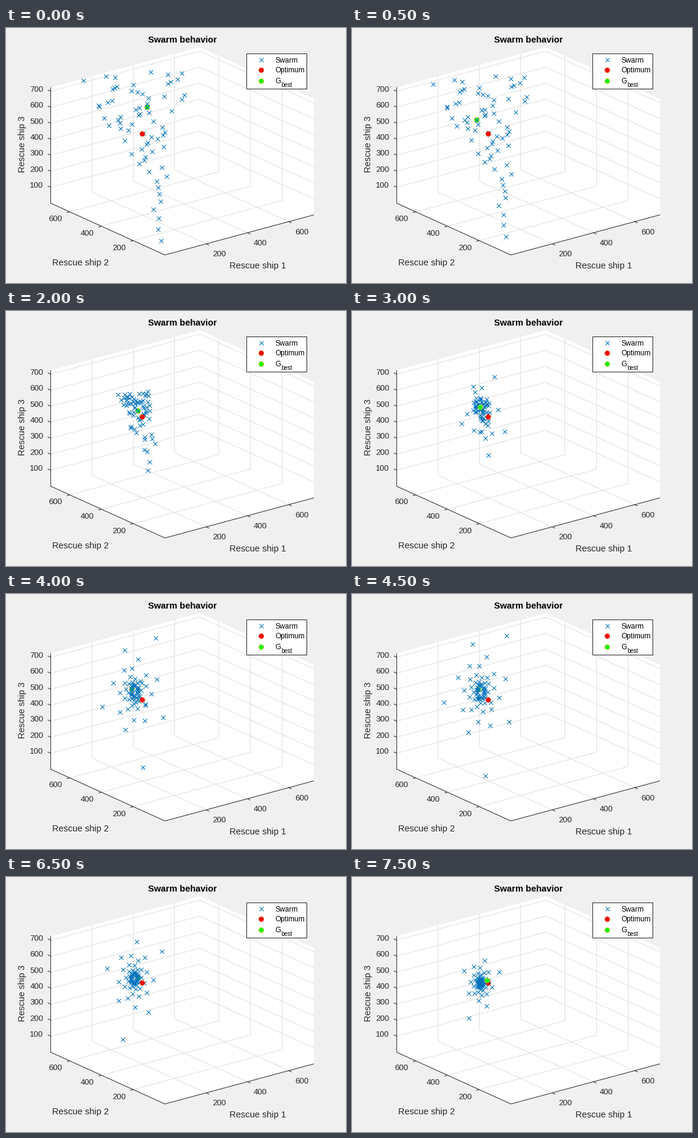
A matplotlib script for the animation above (8 s loop, 560 by 420 pixels).

```python
import numpy as np
import matplotlib.pyplot as plt
from matplotlib.animation import FuncAnimation
from matplotlib.patches import Polygon, Rectangle

W, H, DPI = 560, 420, 100
STEPS, INTERVAL = 16, 500
PX = 72 / DPI
INK, BLUE, GRID = "#262626", "#0072BD", "#dfdfdf"
plt.rcParams["font.family"] = "Liberation Sans"

fig = plt.figure(figsize=(W / DPI, H / DPI), dpi=DPI, facecolor="#f0f0f0")
ax = fig.add_axes([0, 0, 1, 1])
ax.set_xlim(0.3, W + 0.3)
ax.set_ylim(H - 0.5, -0.5)
ax.axis("off")

# Projection of the three axes, in pixels per data unit
ORIGIN = np.array([262, 373.3])
AXES = np.array([[0.34, -0.0915], [-0.2612, -0.1183], [0, -0.2635]])
LIM_X, LIM_Y, LIM_Z = 722, 720, 725


def project(x, y, z):
    return ORIGIN + np.array([x, y, z]) @ AXES


def path(points, color, z=1):
    xs, ys = np.transpose(points)
    ax.plot(xs, ys, color=color, lw=PX, zorder=z, solid_capstyle="butt")


def text(x, y, s, size, ha="center", color=INK, **kw):
    ax.text(x, y, s, fontsize=size * PX, ha=ha, va="baseline", color=color,
            zorder=12, **kw)


def tick(point, dx, dy):
    path([point, point + np.array([dx, dy])], INK, 2)


def dot(x, y, face, edge, z):
    return ax.plot([x], [y], "o", ms=8 * PX, mfc=face, mec=edge,
                   mew=0.8 * PX, zorder=z)[0]


def crosses(x, y, z):
    return ax.plot(x, y, "x", ms=7 * PX, color=BLUE, mew=PX, zorder=z)[0]


def draw_axes():
    hull = [project(0, LIM_Y, LIM_Z), project(LIM_X, LIM_Y, LIM_Z),
            project(LIM_X, 0, LIM_Z), project(LIM_X, 0, 0),
            project(0, 0, 0), project(0, LIM_Y, 0)]
    ax.add_patch(Polygon(hull, fc="white", ec="none", zorder=0))
    for v in (200, 400, 600):
        path([project(v, 0, 0), project(v, LIM_Y, 0), project(v, LIM_Y, LIM_Z)], GRID)
        path([project(0, v, 0), project(LIM_X, v, 0), project(LIM_X, v, LIM_Z)], GRID)
        px, py = project(v, 0, 0), project(0, v, 0)
        tick(px, 4.8, 2.2)
        tick(py, -4.8, 1.3)
        text(px[0] + 21.5, px[1] + 21, str(v), 13.33)
        text(py[0] - 23, py[1] + 15.5, str(v), 13.33)
    for v in range(100, 800, 100):
        path([project(0, LIM_Y, v), project(LIM_X, LIM_Y, v), project(LIM_X, 0, v)], GRID)
        pz = project(0, LIM_Y, v)
        tick(pz, -4.8, -2.2)
        text(61.8, pz[1] + 0.8, str(v), 13.33, ha="right")
    path([project(0, LIM_Y, LIM_Z), project(0, LIM_Y, 0), project(0, 0, 0),
          project(LIM_X, 0, 0)], INK, 2)
    text(290.8, 24, "Swarm behavior", 14.67, color="black", weight="bold")
    text(415.3, 396, "Rescue ship 1", 14.67)
    text(123.3, 391, "Rescue ship 2", 14.67)
    text(30.8, 191, "Rescue ship 3", 14.67, rotation=90, rotation_mode="anchor")


def draw_legend():
    ax.add_patch(Rectangle((396, 42), 99, 58, fc="white", ec=INK, lw=PX, zorder=10))
    crosses([420], [52], 12)
    dot(420, 68.5, "red", "#D95319", 12)
    dot(420, 87, "lime", "#EDB120", 12)
    for y, s in ((57, "Swarm"), (73, "Optimum"), (91, "G")):
        text(443.8, y, s, 12, ha="left", color="black")
    text(453.8, 97, "best", 9.6, ha="left", color="black")


N = 67
rng = np.random.default_rng(7)
rank = (np.arange(N) + 0.5) / N

# First spread: wide at the top, thinning to a tail at the lower right
start = np.column_stack([
    215 + 42 * rank**3 + 95 * (1 - rank)**0.7 * rng.uniform(-1, 1, N),
    70 + 160 * rank + 130 * rank**10])
settle = (1.7 + 0.8 * rank)[:, None]

# Second spread: dense core with a few far flyers, turned by the golden angle
radius = 10 + 80 * rank**3 + 70 * rank**30
angle = np.pi / 2 + 2.4 * (np.arange(N) - N + 1)
order = rng.permutation(N)
radius, angle = radius[order], angle[order]

BEST_T = [0, 1, 2, 3, 4, 5.5, 7.5]
BEST_X = [232, 179, 217, 211, 207, 212, 222]
BEST_Y = [130, 171, 164, 158, 156, 159, 170]


def particles(t):
    center = np.array([211, np.interp(t, [5.5, 7.5], [159, 173])])
    gather = (start - center) * np.exp(-(t / settle)**2)
    burst = 0.15 + 0.85 * np.exp(-((t - 4.9) / 2.6)**2)
    burst *= 1 - np.exp(-(t / 2)**2)
    turn = angle + 0.2 * (t - 5)
    flight = np.column_stack([0.6 * np.cos(turn), np.sin(turn)]) * radius[:, None]
    return center + gather + burst * flight


draw_axes()
draw_legend()
swarm = crosses([], [], 5)
optimum = dot(224, 173.5, "red", "#D95319", 6)
best = dot(0, 0, "lime", "#EDB120", 4)


def update(step):
    t = step * INTERVAL / 1000
    leader = [np.interp(t, BEST_T, BEST_X), np.interp(t, BEST_T, BEST_Y)]
    points = np.vstack([particles(t), leader])
    swarm.set_data(points[:, 0], points[:, 1])
    best.set_data([leader[0]], [leader[1]])
    # Depth order of the markers as the leader passes in front
    best.set_zorder(7 if 2.5 <= t < 4 or t >= 7 else 4)
    optimum.set_zorder(3 if t >= 7 else 6)
    return swarm, best, optimum


anim = FuncAnimation(fig, update, frames=STEPS, interval=INTERVAL,
                     repeat=True, repeat_delay=0, blit=False)
plt.show()
```
